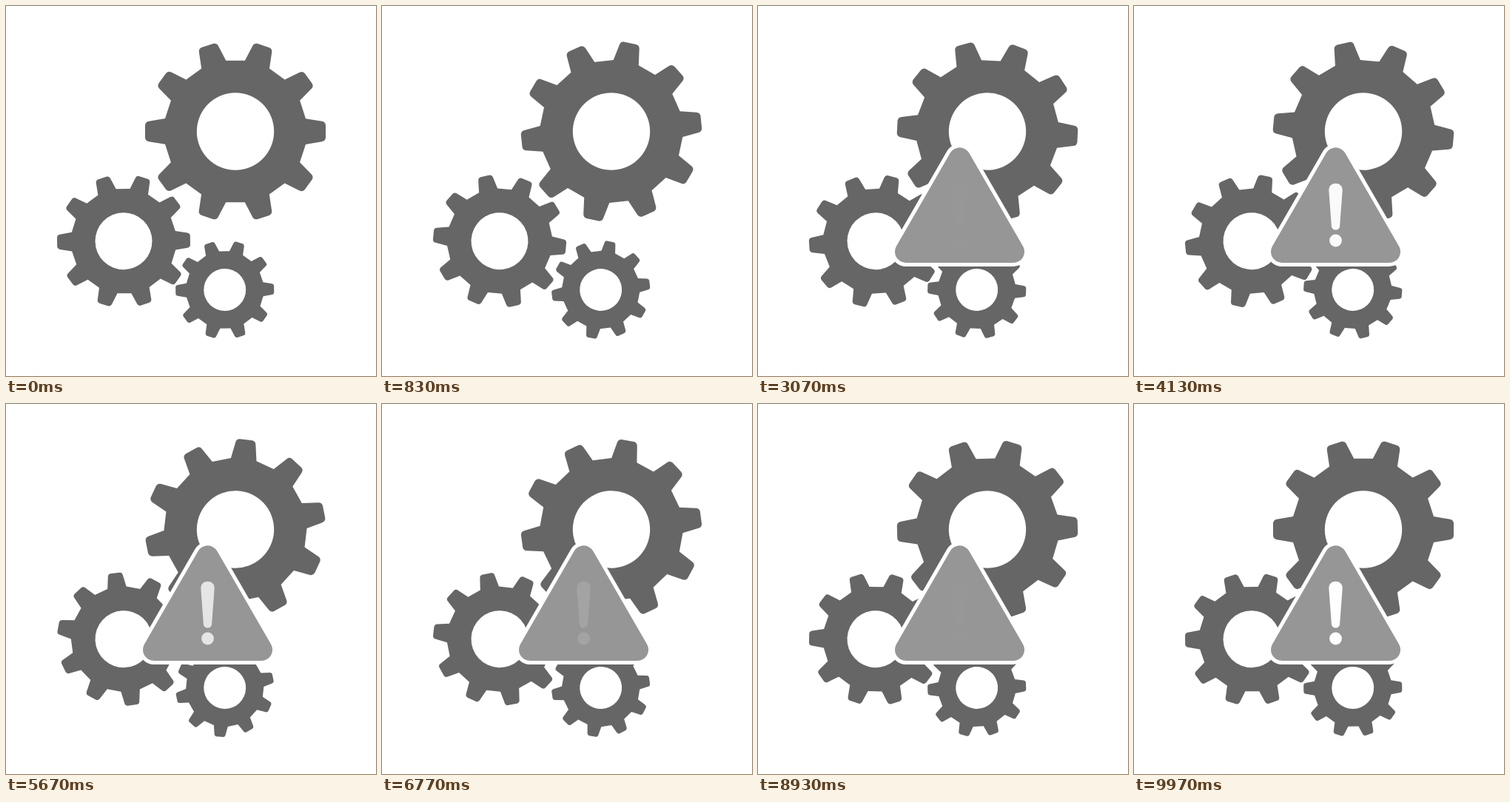
An HTML page that plays this animation: 500x500 px, repeating every 10 s.

```html
<!DOCTYPE html>
<html lang="en">
<head>
<meta charset="utf-8">
<title>Gears with warning</title>
<style>
  html, body { margin: 0; width: 100%; height: 100%; overflow: hidden; background: #fff; }
  svg { display: block; width: 100vw; height: 100vh; }
</style>
</head>
<body>
<svg viewBox="0 0 500 500">
  <g id="gears" fill="#666"></g>
  <g id="sign" stroke-linejoin="round">
    <path d="M0 -62.6L72.5 63H-72.5Z" fill="#fff" stroke="#fff" stroke-width="40"/>
    <path d="M0 -62.6L72.5 63H-72.5Z" fill="#969696" stroke="#969696" stroke-width="30"/>
    <g id="mark" fill="#fff">
      <path d="M-9.2 -20C-9.2 -32.3 9.2 -32.3 9.2 -20L5.6 28.5C5 35.3 -5 35.3 -5.6 28.5Z"/>
      <circle cy="48" r="8.4"/>
    </g>
  </g>
</svg>
<script>
const LOOP = 10000;
const TURN = 9970;      // one full revolution
const GROW = [1500, 2500];
const BLINK = 3000;     // first fade-in of the mark
const TEETH = 10;

const byId = id => document.getElementById(id);
const sign = byId('sign'), mark = byId('mark');

// x, y, scale, direction, starting angle
const gears = [
  [310, 169.5, 1, 1, 0],
  [159, 317.7, 0.737, -1, -0.7],
  [295.7, 383.5, 0.545, 1, -0.8]
];

function gearPath() {
  let d = '';
  for (let i = 0; i < TEETH; i++) {
    const a = i * 2 * Math.PI / TEETH, c = Math.cos(a), s = Math.sin(a);
    const p = (x, y) => `${(x * c - y * s).toFixed(2)} ${(x * s + y * c).toFixed(2)} `;
    d += (i ? 'L' : 'M') + p(95, -17.4) +
      'L' + p(117, -13.7) + 'Q' + p(121.5, -13) + p(122, -8.5) +
      'L' + p(122, 8.5) + 'Q' + p(121.5, 13) + p(117, 13.7) +
      'L' + p(95, 17.4);
  }
  const r = 52.2;
  return d + `ZM${r} 0A${r} ${r} 0 1 0 ${-r} 0A${r} ${r} 0 1 0 ${r} 0Z`;
}

const shape = gearPath();
const wheels = gears.map(() => {
  const path = document.createElementNS('http://www.w3.org/2000/svg', 'path');
  path.setAttribute('d', shape);
  path.setAttribute('fill-rule', 'evenodd');
  return byId('gears').appendChild(path);
});

const clamp = v => Math.min(1, Math.max(0, v));
const ease = v => (1 - Math.cos(Math.PI * v)) / 2;

function draw(t) {
  const angle = 360 * clamp(t / TURN);
  gears.forEach(([x, y, k, dir, start], i) => {
    wheels[i].setAttribute('transform',
      `translate(${x} ${y}) rotate(${start + dir * angle}) scale(${k})`);
  });
  const size = ease(clamp((t - GROW[0]) / (GROW[1] - GROW[0])));
  sign.setAttribute('visibility', size > 0 ? 'visible' : 'hidden');
  sign.setAttribute('transform', `translate(272.5 269) scale(${size})`);
  mark.setAttribute('opacity', t < BLINK ? 0 : ease((t - BLINK) / 1000));
}

const begin = performance.now();
function tick() {
  draw((performance.now() - begin) % LOOP);
  requestAnimationFrame(tick);
}
draw(0);
requestAnimationFrame(tick);
</script>
</body>
</html>
```
